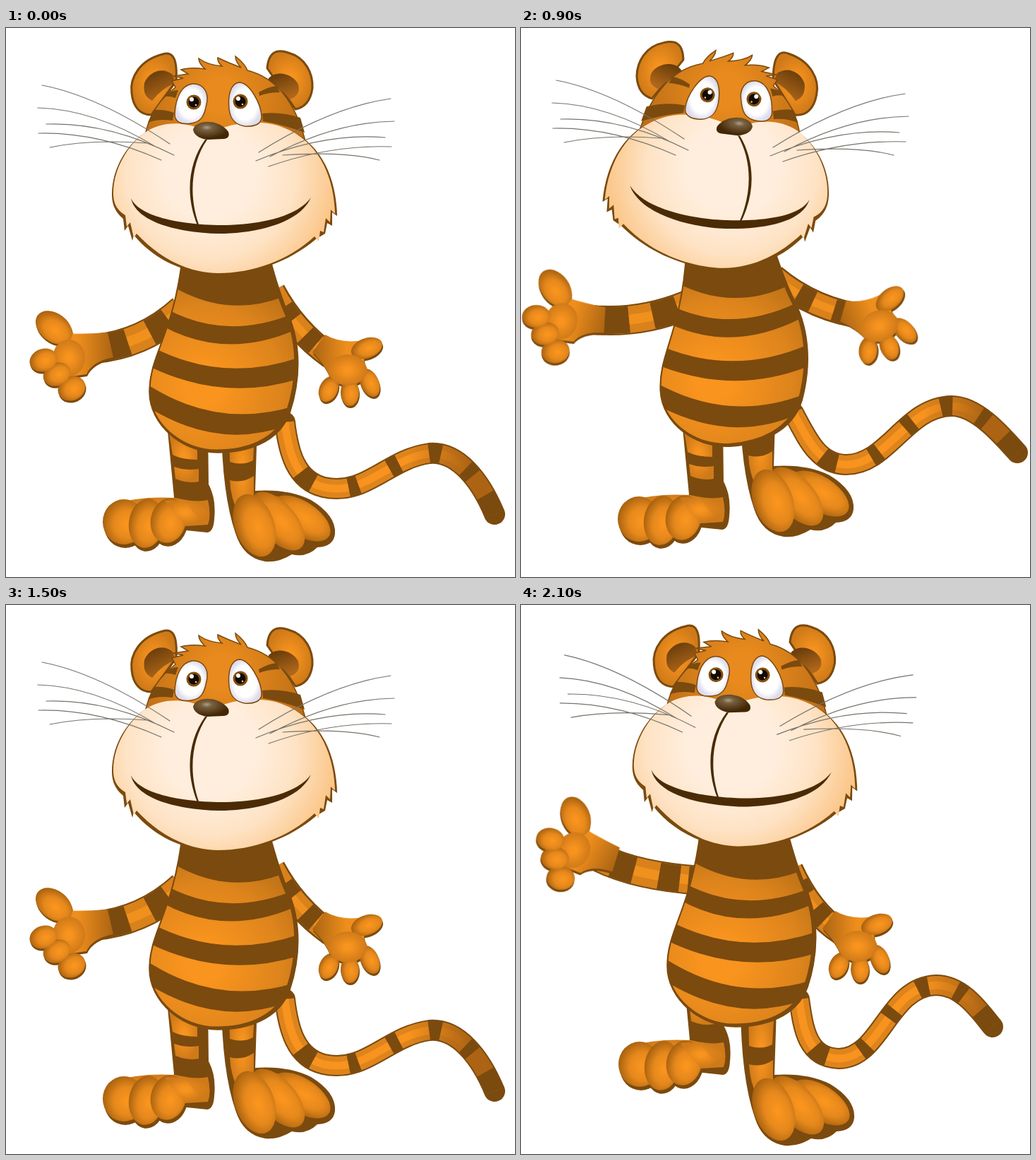
These frames come from a looping animation (721x777 px, 2300 ms). An HTML page without scripts:

```html
<!DOCTYPE html>
<html lang="en">
<head>
<meta charset="utf-8">
<title>Dancing tiger</title>
<style>
html, body { margin: 0; width: 100%; height: 100%; overflow: hidden; background: #fff; }
svg { display: block; width: 100%; height: 100%; }
.dark { fill: #7b4a0e; }
.ink { fill: #4a2b05; }
.rim { stroke: #7b4a0e; stroke-width: 3; stroke-linejoin: round; }
.fine { stroke: #7b4a0e; stroke-width: 1.5; }
.line { fill: none; }
.toe { fill: url(#toe); }
.skin { fill: url(#skin); }
.lift { filter: drop-shadow(2px 5px 0 #7b4a0e); }
.thin { filter: drop-shadow(1px 3px 0 #7b4a0e); }
.hair { fill: none; stroke: #77736c; stroke-width: 1.2; stroke-linecap: round; }

/* layered limbs: outline, base, light, stripes */
.limb { fill: none; }
.edge { stroke: #7b4a0e; }
.base { stroke: #d9811b; }
.light { stroke: #f0901d; }
.bands { stroke: #7b4a0e; stroke-dasharray: var(--d); }
.tail { --d: 0 88 28 60 17 58 18 53 20 48 17 38 60; }
.tail .edge { stroke-width: 30px; stroke-linecap: round; }
.tail .base { stroke: url(#tailBase); stroke-width: 26px; }
.tail .light { stroke: url(#tailLight); stroke-width: 11px; }
.tail .bands { stroke-width: 27px; }
.armL .edge { stroke-width: 42px; }
.armL .base, .armL .bands { stroke-width: 38px; }
.armL .light { stroke-width: 14px; }
.armR .edge { stroke-width: 36px; }
.armR .base, .armR .bands { stroke-width: 31px; }
.armR .light { stroke-width: 11px; }

.pose, .lids { visibility: hidden; animation: 2.3s step-end infinite; }
.rest { animation-name: rest; }
.left { animation-name: left; }
.right { animation-name: right; }
.lids { animation-name: blink; }
@keyframes rest {
  0%, 47.826%, 65.217%, 82.609% { visibility: visible; }
  39.13%, 56.522%, 73.913%, 91.304%, 100% { visibility: hidden; }
}
@keyframes left {
  0%, 47.826%, 82.609%, 100% { visibility: hidden; }
  39.13%, 73.913% { visibility: visible; }
}
@keyframes right {
  0%, 65.217% { visibility: hidden; }
  56.522%, 91.304%, 100% { visibility: visible; }
}
@keyframes blink {
  0%, 30.435%, 100% { visibility: hidden; }
  21.739% { visibility: visible; }
}
</style>
</head>
<body>
<svg viewBox="0 0 721 777" preserveAspectRatio="none">
<defs>
  <radialGradient id="toe" cx=".58" cy=".55" r=".58">
    <stop offset=".1" stop-color="#f9941e"/><stop offset=".55" stop-color="#e5881c"/><stop offset="1" stop-color="#a9620f"/>
  </radialGradient>
  <radialGradient id="skin">
    <stop offset=".2" stop-color="#f7931e"/><stop offset="1" stop-color="#cf7a19"/>
  </radialGradient>
  <linearGradient id="wristL">
    <stop offset=".35" stop-color="#ee8e1d"/><stop offset="1" stop-color="#ab6412"/>
  </linearGradient>
  <linearGradient id="wristR" href="#wristL" x1="1" x2="0"/>
  <radialGradient id="belly" gradientUnits="userSpaceOnUse" cx="280" cy="505" r="185">
    <stop offset=".15" stop-color="#f9941e"/><stop offset=".6" stop-color="#dd841c"/><stop offset="1" stop-color="#b06a15"/>
  </radialGradient>
  <radialGradient id="crown" gradientUnits="userSpaceOnUse" cx="305" cy="95" r="125">
    <stop offset=".2" stop-color="#e88a1d"/><stop offset="1" stop-color="#bd6e16"/>
  </radialGradient>
  <radialGradient id="face" gradientUnits="userSpaceOnUse" cx="290" cy="205" r="185">
    <stop offset=".35" stop-color="#ffeedd"/><stop offset=".65" stop-color="#fee3c5"/><stop offset="1" stop-color="#fbc382"/>
  </radialGradient>
  <radialGradient id="nose" cx=".38" cy=".32" r=".62">
    <stop offset="0" stop-color="#aaa08f"/><stop offset=".25" stop-color="#78603f"/><stop offset="1" stop-color="#432604"/>
  </radialGradient>
  <radialGradient id="eye">
    <stop offset=".7" stop-color="#fff"/><stop offset="1" stop-color="#dedcec"/>
  </radialGradient>
  <linearGradient id="lid">
    <stop offset="0" stop-color="#7d4a0d"/><stop offset="1" stop-color="#593306"/>
  </linearGradient>
  <linearGradient id="inner" x2=".5" y2="1">
    <stop offset="0" stop-color="#5e3608"/><stop offset="1" stop-color="#b0671a"/>
  </linearGradient>
  <linearGradient id="tailBase" gradientUnits="userSpaceOnUse" x1="570" x2="660" y1="0" y2="0">
    <stop offset="0" stop-color="#dd841c"/><stop offset="1" stop-color="#ac6314"/>
  </linearGradient>
  <linearGradient id="tailLight" gradientUnits="userSpaceOnUse" x1="570" x2="660" y1="0" y2="0">
    <stop offset="0" stop-color="#f7931e"/><stop offset="1" stop-color="#ac6314"/>
  </linearGradient>

  <path id="torso" d="M250 322H373Q386 372 400 405C419 450 417 500 402 545C386 588 340 601 300 601C250 601 203 562 203 515C203 462 237 435 250 322Z"/>
  <clipPath id="torsoClip"><use href="#torso"/></clipPath>
  <path id="lidL" d="M264 79C280 78 288 92 284 108C281 125 276 133 262 135C248 137 239 133 239 122C240 100 248 81 264 79Z"/>
  <path id="lidR" d="M330 77C345 77 362 108 362 126C362 137 350 140 338 139C325 137 318 130 316 115C314 95 318 79 330 77Z"/>

  <g id="body">
    <use href="#torso" fill="url(#belly)"/>
    <g class="dark" clip-path="url(#torsoClip)">
      <path d="M230 315H395L391 381Q315 410 240 368Z"/>
      <path d="M230 399Q310 441 400 407L408 428Q310 470 222 422Z"/>
      <path d="M210 453Q310 503 416 466V496Q310 530 205 480Z"/>
      <path d="M198 503Q300 570 412 534L396 563Q300 598 200 536Z"/>
      <use href="#torso" class="rim line" x="-2" y="-1" style="stroke-width:7px"/>
    </g>
    <use href="#torso" class="fine line"/>
  </g>

  <g id="eyeball">
    <circle r="10.5" fill="#84500f"/><circle r="7.5" fill="#130a02"/>
    <circle cx="-3" cy="-4" r="3" fill="#fff"/><circle cx="3" cy="4" r="1.3" fill="#e9c9a0"/>
  </g>

  <g id="head">
    <path class="skin rim" d="M241 75C243 45 237 32 222 37C190 45 175 70 178 92C180 112 190 123 206 123Z"/>
    <path fill="url(#inner)" d="M236 66C222 54 202 62 196 78C194 92 198 98 207 103Q222 84 240 78Z"/>
    <path class="skin rim" d="M370 57C372 32 385 30 400 35C425 42 435 65 434 85C432 100 425 112 410 115Z"/>
    <path fill="url(#inner)" d="M372 71C385 58 408 66 414 80C417 92 412 97 402 101Q388 83 371 76Z"/>
    <path class="fine" fill="url(#crown)" d="M197 152Q205 110 240 84L235 75 251 71 237 68Q252 66 258 65L248 59Q262 55 282 58Q273 50 273 43Q285 52 306 54Q299 48 300 42Q312 48 333 56Q325 48 325 40Q338 50 342 60Q402 75 424 160L300 190Z"/>
    <g class="dark">
      <path d="M244 88Q232 88 224 97Q232 96 240 99ZM209 116Q224 115 238 120L236 131Q215 128 201 134Z"/>
      <path d="M358 91Q372 83 383 82L388 91Q372 91 359 96ZM363 121Q390 118 417 127L423 148Q390 136 364 132Z"/>
    </g>
    <path class="dark" d="M150 236C150 195 175 160 202 145C225 134 255 133 290 149C320 134 365 130 395 142C445 160 468 210 469 266L462 261V280L455 276 452 291 440 298C400 332 350 349 300 349C250 348 207 325 181 293L179 301 173 280 168 287 166 270C155 261 150 250 150 236Z"/>
    <path fill="url(#face)" d="M152 234C152 196 177 159 203 144C227 132 255 131 290 149C320 132 365 129 393 141C442 159 465 210 466 263L460 257 459 275 453 269 450 289 445 287 443 302 437 295C400 329 350 347 300 347C250 346 212 320 185 291L181 297 176 275 171 281 169 265C157 258 152 248 152 234Z"/>
    <path class="ink" d="M177 241C190 270 260 279 305 279C350 279 410 270 432 240C415 278 350 291 302 291C250 290 185 277 177 241Z"/>
    <path class="ink" d="M282 158C259 190 253 235 271 279L273 278C258 235 263 190 285 158Z"/>
    <use href="#lidL" class="fine" fill="url(#eye)"/>
    <use href="#lidR" class="fine" fill="url(#eye)"/>
    <use href="#eyeball" x="266" y="105"/>
    <use href="#eyeball" x="332" y="104"/>
    <path fill="url(#nose)" d="M265 144C268 129 302 128 315 147Q318 156 308 157L285 158Q267 155 265 144Z"/>
  </g>

  <g id="whiskers" class="hair">
    <path d="M51 81Q130 96 232 164M45 113Q125 115 212 168M57 136Q145 133 238 180M46 149Q130 147 220 187M62 169Q120 157 200 163"/>
    <path d="M545 100Q460 112 358 176M550 132Q465 133 374 182M537 155Q450 148 354 188M546 168Q460 165 372 196M529 187Q480 174 392 180"/>
  </g>

  <g id="legL" class="lift">
    <path class="dark" d="M228 560H284L285 642Q296 660 293 690Q292 708 283 709L245 705 220 690 238 664Z"/>
    <path class="skin" d="M231 573L271 580V611Q250 611 236 604ZM238 621Q255 627 273 624V642Q256 645 240 638Z"/>
    <path class="skin" d="M150 674Q190 662 240 665Q270 672 286 668Q291 690 286 703L240 706Z"/>
    <ellipse class="toe" cx="167" cy="699" rx="30" ry="32"/>
    <ellipse class="toe" cx="199" cy="701" rx="25" ry="35" transform="rotate(8 199 701)"/>
    <ellipse class="toe" cx="230" cy="697" rx="25" ry="32" transform="rotate(12 230 697)"/>
    <path class="skin" d="M225 669Q255 665 262 681Q272 695 282 699L254 703 240 690Z"/>
  </g>

  <g id="legR">
    <path class="dark" d="M305 560H356L353 655Q400 652 432 668Q468 690 466 716Q464 734 441 735Q426 750 405 745Q386 757 367 755Q336 750 325 715Q306 660 305 560Z"/>
    <path class="skin" d="M316 560H353L350 612Q335 620 317 614ZM317 640Q335 645 351 634V662L330 690Q318 665 317 640Z"/>
    <path class="skin" d="M330 668Q370 655 418 670L440 700 390 715 335 700Z"/>
    <ellipse class="toe" cx="418" cy="694" rx="24" ry="47" transform="rotate(-57 418 694)"/>
    <ellipse class="toe" cx="385" cy="698" rx="26" ry="50" transform="rotate(-41 385 698)"/>
    <ellipse class="toe" cx="352" cy="704" rx="28" ry="46" transform="rotate(-20 352 704)"/>
  </g>

  <g id="handL" class="thin">
    <path fill="url(#wristL)" d="M74 432Q108 434 144 431L152 466Q122 472 114 490L80 495Z"/>
    <ellipse class="toe" cx="68" cy="424" rx="29" ry="20" transform="rotate(37 68 424)"/>
    <ellipse class="skin" cx="89" cy="467" rx="23" ry="26"/>
    <ellipse class="toe" cx="93" cy="510" rx="20" ry="17" transform="rotate(-25 93 510)"/>
    <ellipse class="toe" cx="72" cy="490" rx="20" ry="16" transform="rotate(-25 72 490)"/>
    <ellipse class="toe" cx="53" cy="470" rx="20" ry="16" transform="rotate(-20 53 470)"/>
  </g>

  <g id="handR" class="thin">
    <path fill="url(#wristR)" d="M452 434Q474 447 506 442L508 485 460 500Q456 480 434 459Z"/>
    <ellipse class="toe" cx="511" cy="453" rx="23" ry="14" transform="rotate(-20 511 453)"/>
    <ellipse class="toe" cx="515" cy="502" rx="13" ry="21" transform="rotate(-24 515 502)"/>
    <ellipse class="toe" cx="487" cy="516" rx="13" ry="19"/>
    <ellipse class="toe" cx="457" cy="511" rx="13" ry="19" transform="rotate(25 457 511)"/>
    <ellipse class="skin" cx="484" cy="484" rx="27" ry="22"/>
  </g>

  <path id="t1" pathLength="480" d="M395 558C400 600 410 640 450 650C510 663 540 610 600 602C640 599 672 640 692 688"/>
  <path id="t2" pathLength="480" d="M386 545C405 580 420 617 460 618C520 618 545 536 610 535C645 535 680 575 703 601"/>
  <path id="t3" pathLength="480" d="M394 558C400 600 405 640 450 642C510 642 520 540 588 538C625 538 650 575 668 597"/>
  <path id="l1" d="M250 398Q195 448 125 454"/>
  <path id="l2" d="M238 391Q165 421 92 412"/>
  <path id="l3" d="M255 390Q165 384 112 358"/>
  <path id="r1" d="M378 372Q408 428 460 465"/>
  <path id="r2" d="M358 352Q415 400 490 409"/>
  <path id="r3" d="M382 374Q410 436 454 464"/>
</defs>

<g class="pose rest">
  <g class="limb tail"><use href="#t1" class="edge"/><use href="#t1" class="base"/><use href="#t1" class="light"/><use href="#t1" class="bands"/></g>
  <use href="#legL"/><use href="#legR"/>
  <g class="limb armL" style="--d:0 25 32 34 31 999"><use href="#l1" class="edge"/><use href="#l1" class="base"/><use href="#l1" class="light"/><use href="#l1" class="bands"/></g>
  <use href="#handL"/>
  <g class="limb armR" style="--d:0 28 22 28 20 999"><use href="#r1" class="edge"/><use href="#r1" class="base"/><use href="#r1" class="light"/><use href="#r1" class="bands"/></g>
  <use href="#handR"/>
  <use href="#body"/><use href="#head"/><use href="#whiskers"/>
</g>
<g class="lids">
  <use href="#lidL" fill="url(#lid)"/><use href="#lidR" fill="url(#lid)"/>
  <use href="#whiskers"/>
</g>

<g class="pose left">
  <g class="limb tail"><use href="#t2" class="edge"/><use href="#t2" class="base"/><use href="#t2" class="light"/><use href="#t2" class="bands"/></g>
  <use href="#legL" y="-4"/><use href="#legR" x="5" y="-35"/>
  <g class="limb armL" style="--d:0 17 37 34 36 999"><use href="#l2" class="edge"/><use href="#l2" class="base"/><use href="#l2" class="light"/><use href="#l2" class="bands"/></g>
  <use href="#handL" transform="translate(100 -58.4) rotate(16)"/>
  <g class="limb armR" style="--d:0 42 24 32 22 999"><use href="#r2" class="edge"/><use href="#r2" class="base"/><use href="#r2" class="light"/><use href="#r2" class="bands"/></g>
  <use href="#handR" transform="translate(-112.7 132.5) rotate(-20)"/>
  <use href="#body" transform="matrix(1 -.08 .053 1 -33 15)"/>
  <use href="#head" transform="matrix(-.997 -.075 -.075 .997 603 16)"/>
  <use href="#whiskers" x="-1" y="-7"/>
</g>

<g class="pose right">
  <g class="limb tail"><use href="#t3" class="edge"/><use href="#t3" class="base"/><use href="#t3" class="light"/><use href="#t3" class="bands"/></g>
  <use href="#legL" x="1" y="-49"/><use href="#legR" x="6" y="10"/>
  <g class="limb armL" style="--d:18 12 30 36 31 999"><use href="#l3" class="edge"/><use href="#l3" class="base"/><use href="#l3" class="light"/><use href="#l3" class="bands"/></g>
  <use href="#handL" transform="translate(230.7 -102) rotate(30)"/>
  <g class="limb armR" style="--d:0 22 20 24 21 999"><use href="#r3" class="edge"/><use href="#r3" class="base"/><use href="#r3" class="light"/><use href="#r3" class="bands"/></g>
  <use href="#handR" x="-7" y="-1"/>
  <use href="#body" x="4" y="-4"/>
  <g transform="matrix(1 .018 -.018 1 12 -11)"><use href="#head"/><use href="#whiskers"/></g>
</g>
</svg>
</body>
</html>
```
